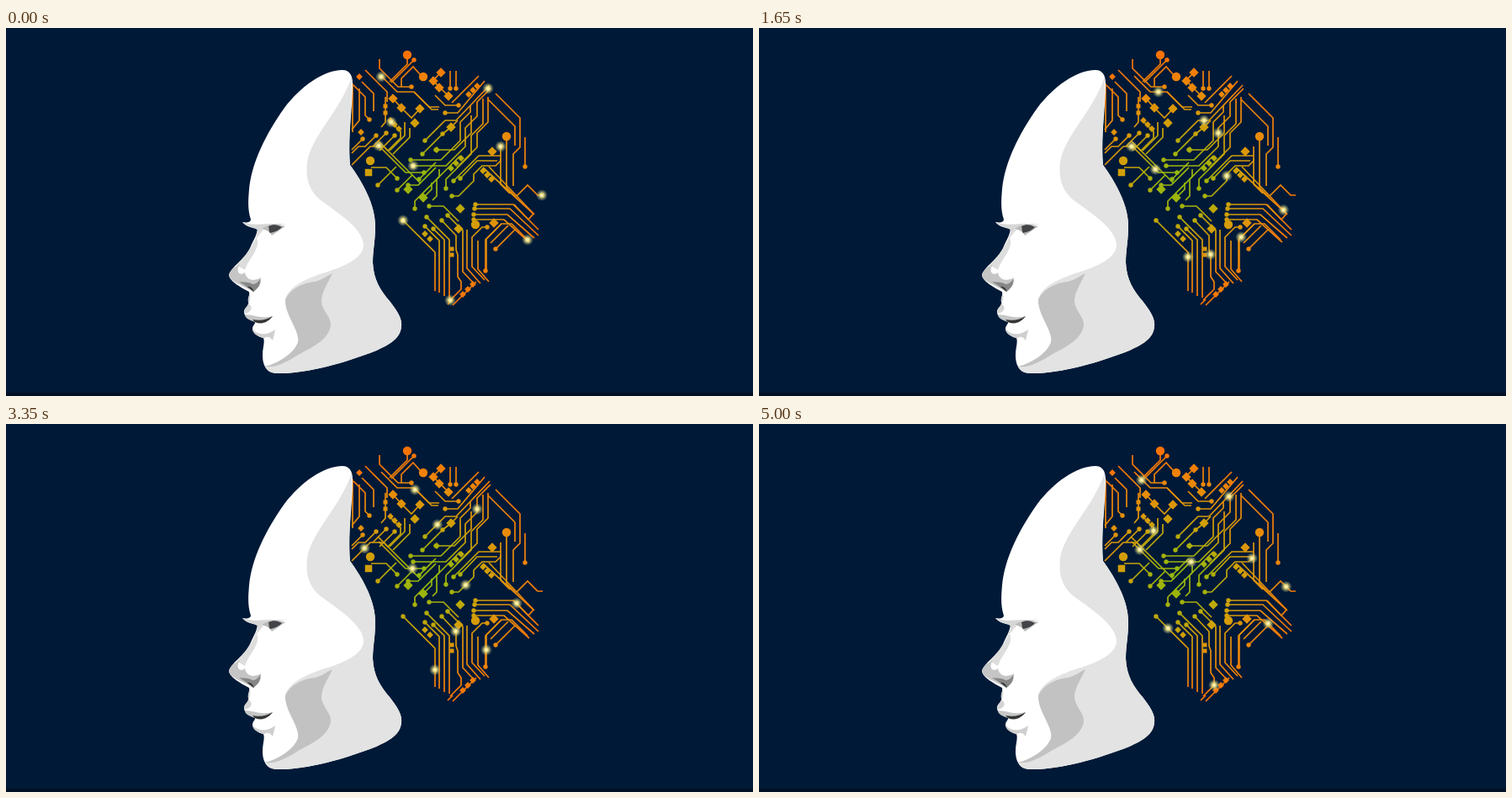
An HTML page for the animation above (5.05 s loop, 888x438 px).

```html
<!DOCTYPE html>
<html lang="en">
<head>
<meta charset="utf-8">
<title>Circuit mind</title>
<style>
html, body { margin: 0; width: 100%; height: 100%; overflow: hidden; background: #001937; }
svg { display: block; width: 100%; height: 100%; }
</style>
</head>
<body>
<svg viewBox="0 0 888 438">
  <defs>
    <radialGradient id="heat" gradientUnits="userSpaceOnUse" cx="500" cy="182" r="150">
      <stop offset="0" stop-color="#8fb90e"/>
      <stop offset=".22" stop-color="#a5b30a"/>
      <stop offset=".45" stop-color="#d0a108"/>
      <stop offset=".72" stop-color="#e98b0a"/>
      <stop offset="1" stop-color="#fb7306"/>
    </radialGradient>
    <radialGradient id="glow">
      <stop offset="0" stop-color="#fffbd0"/>
      <stop offset=".3" stop-color="#f4e68a" stop-opacity=".95"/>
      <stop offset=".55" stop-color="#d9d07c" stop-opacity=".6"/>
      <stop offset="1" stop-color="#b5b57a" stop-opacity="0"/>
    </radialGradient>
  </defs>
  <rect width="888" height="438" fill="#001937"/>
  <rect y="434" width="888" height="4" fill="#001024"/>
  <g id="board" fill="none" stroke="url(#heat)" stroke-width="1.7"></g>
  <g id="parts" fill="url(#heat)"></g>
  <g id="face">
    <path fill="#fff" d="M400 50C408 50 412 56 412 66C412 96 406 132 409 163C424 184 439 210 439 236C439 254 436 264 436 279C437 300 445 312 456 325C465 337 471 345 470 355C469 370 455 377 440 384C402 399 355 412 322 411C309 410 305 401 305 389C305 381 308 374 306 369C299 367 293 363 293 358C293 354 297 352 296 349C288 347 282 342 283 337C284 332 289 331 288 326C287 321 290 319 289 314C280 309 266 302 265 294C267 285 283 276 290 262C293 254 298 248 299 239C292 238 285 236 281 231C287 232 291 231 291 228C287 216 288 205 289 192C292 160 309 126 331 95C350 70 377 50 400 50Z"/>
    <path fill="#e2e3e2" d="M411 58C412 90 406 132 409 163C424 184 439 210 439 236C439 254 436 264 436 279C437 300 445 312 456 325C465 337 471 345 470 355C469 370 455 377 440 384C402 399 355 412 322 411C314 411 309 407 308 402C330 402 354 381 349 365C339 345 331 335 332 322C337 308 354 299 379 291C402 284 425 274 425 258C424 238 393 219 374 205C360 193 356 180 358 160C363 128 398 98 411 58Z"/>
    <path fill="#c1c2c1" d="M388 292C383 304 375 313 375 326C376 337 387 344 386 354C384 371 362 381 349 388C336 396 322 405 308 403C323 399 342 388 347 374C350 361 332 343 332 324C337 311 353 303 367 302C376 300 381 295 388 292Z"/>
    <path fill="#dcdddc" d="M299 241C298 253 286 271 274 282L284 288C287 276 304 261 298 250L307 239Z"/>
    <path fill="#c4c5c4" d="M265 294C267 287 273 284 278 281C272 290 278 296 284 291C286 302 297 301 303 297C304 306 299 310 294 314C283 307 266 302 265 294Z"/>
    <path fill="#858685" d="M277 302C284 303 289 302 293 305C297 305 300 302 302 299C303 306 299 310 294 314C289 309 283 306 277 302Z"/>
    <path fill="#303234" d="M287 308C290 307 293 309 295 314Z"/>
    <path fill="#d5d6d5" d="M281 231C298 237 312 231 334 234C322 234 309 235 300 242C299 238 289 238 281 231Z"/>
    <path fill="#b9bab9" d="M304 239C312 233 322 233 332 236L316 247C313 242 309 240 304 239Z"/>
    <path fill="#424447" d="M312 236C318 233 323 234 328 237C324 241 319 243 314 244C312 241 313 239 312 236Z"/>
    <path fill="#d4d5d4" d="M289 315C292 321 289 324 289 329C294 332 292 339 283 340C282 333 289 332 288 326C287 321 290 319 289 315Z"/>
    <path fill="#c6c7c6" d="M284 341C293 341 300 345 311 344L317 343C311 351 302 354 296 350C288 347 284 345 284 341Z"/>
    <path fill="#333537" d="M293 347C303 349 310 347 317 343C311 351 303 353 296 350Z"/>
    <path fill="#cecfce" d="M293 358C298 365 309 367 320 359C319 365 318 367 317 372C313 366 310 368 306 369C299 367 293 363 293 358Z"/>
  </g>
  <g id="lights"></g>
</svg>
<script>
const NS = 'http://www.w3.org/2000/svg';
const LOOP = 5050, HALF = 2780, STEP = 50;
const el = (id) => document.getElementById(id);
const add = (parent, tag, attrs) => {
  const node = document.createElementNS(NS, tag);
  for (const k in attrs) node.setAttribute(k, attrs[k]);
  return parent.appendChild(node);
};
const dot = (x, y, r) => add(el('parts'), 'circle', { cx: x, cy: y, r });
const chip = (x, y, s, turn = 45) => add(el('parts'), 'rect', {
  x: x - s / 2, y: y - s / 2, width: s, height: s, transform: `rotate(${turn} ${x} ${y})`
});

// A leading "o" puts a solder dot on the first point.
const crown = [
  'o482 70H466L444 48V37', 'M446 57L465 76H485L506 97H514', 'M427 50L453 76V88',
  'o485 38L458 65', 'M477 36V43L456 64', 'M492 55L484 46L470 60V70',
  'o432 109L427 104V82L413 68', 'M423 64L437 78V99', 'M412 66V124', 'M420 72V110L411 121',
  'M451 82V112L446 118', 'M460 84L470 95', 'M470 95L482 107L492 96', 'M508 63L526 81',
  'M517 53L507 63', 'o528 72V51', 'o535 72V51', 'o538 92H522L510 80',
  'M562 57L530 89', 'o522 101H537L569 63', 'o498 134L522 110H535L575 68', 'M485 76L503 94H515'
];
const side = [
  'o440 128L427 141H419L411 149', 'o452 125L436 141', 'M458 112L469 123V131L454 146L449 141H433L411 163',
  'o462 128L444 146', 'M474 112V128L456 146', 'M442 134L493 185', 'o497 172H475L443 140',
  'o442 187L464 165', 'o465 179L452 166H434', 'M480 119V130L460 150', 'o424 132L411 145'
];
const centre = [
  'o484 164H523L546 141V119L560 105V88L576 72', 'o481 157H517L540 134V112L552 100V92',
  'o491 180L511 160', 'o511 145H533L553 125V104', 'o519 126L529 118L537 110', 'o478 187H490L511 166',
  'o495 150L519 126', 'o465 193L483 175', 'o523 191V180L553 150V128L567 114V84',
  'o486 215V206L515 177V168', 'M507 205L512 200V180L540 152', 'o532 182L562 152H588',
  'o530 200H538L556 182V174L566 164H582L588 158V141', 'M573 82V112L560 125V142L536 166',
  'o540 179L560 158H584', 'M496 202L506 192V184'
];
const right = [
  'M582 78L611 107V142L603 150V188', 'M573 85L605 117V140', 'o617 165V130', 'M595 129V190L606 201',
  'M588 156V186L599 197', 'M638 199H632L620 187L607 200', 'M567 166L627 221L621 228L604 210',
  'M574 165L628 222', 'o558 210H603L633 240', 'o557 215H599L633 247', 'o556 222H596L628 250',
  'o556 228H592L622 255', 'M620 252L601 233H589L571 251V290', 'o582 263L605 240', 'M576 256L597 235'
];
const stem = [
  'o472 229L510 267V313', 'o498 236L515 253V315', 'o508 239L521 252V319', 'o500 225L527 252V321',
  'o518 229L535 247V264L537 270V296L541 302V311L528 324', 'o525 223L543 241V290L557 305',
  'o503 212H520L538 230', 'M548 240V286L564 304', 'o572 237H566L554 249V284L569 300',
  'o570 289V252L589 233', 'M561 253V287L574 302', 'M531 330L559 302', 'M525 329L531 323'
];
for (const trace of [...crown, ...side, ...centre, ...right, ...stem]) {
  add(el('board'), 'path', { d: trace.replace('o', 'M') });
  if (trace[0] === 'o') dot(...trace.match(/\d+/g).slice(0, 2), 2.7);
}

for (const [x, y] of [[477, 32], [496, 58], [595, 129], [433, 158], [558, 234]]) dot(x, y, 5.2);
for (const [x, y] of [[517, 53], [508, 63], [515, 71], [526, 81], [460, 84], [470, 95], [492, 96],
  [486, 113], [529, 118], [578, 147], [478, 192], [496, 202], [540, 215], [538, 239], [580, 232]]) chip(x, y, 8);
for (const [x, y] of [[420, 58], [422, 124], [512, 145], [498, 245], [504, 251]]) chip(x, y, 5.5);
for (const [x, y] of [[451, 93], [451, 101], [530, 263], [530, 270]]) chip(x, y, 5, 0);
chip(431, 172, 8.5, 0);

// Rows of three small bars lying across a diagonal.
const bars = (x, y, dx, dy) => {
  for (let i = 0; i < 3; i++) chip(x + i * dx, y + i * dy, 5.5);
};
bars(457, 110, 5, 5);
bars(550, 79, 5, -5);
bars(529, 167, 6, -6);
bars(567, 170, 5, 5);
bars(543, 317, 6, -6);

// Each light runs along its route and back; pow bends its pace.
const routes = [
  ['446 58 464 76 484 76 495 87'],
  ['573 72 535 110 523 110 498 134'],
  ['458 112 469 123 469 131 454 146 449 141 433 141 412 162'],
  ['443 140 475 172 497 172'],
  ['484 164 523 164 546 141 546 119 560 105 560 88 572 76'],
  ['588 141 588 158 582 164 566 164 556 174 556 182 538 200 530 200'],
  ['637 199 632 199 620 187 607 200 627 220 621 228 604 210 568 210', 1.5],
  ['472 229 510 267 510 313'],
  ['620 252 601 233 589 233 571 251 571 290'],
  ['528 324 541 311 541 302 537 297 537 270 535 264 535 247 518 229', 1.1]
];
const lights = routes.map(([text, pow = 1]) => {
  const n = text.split(' ').map(Number), legs = [];
  let total = 0;
  for (let i = 0; i + 3 < n.length; i += 2) {
    const [x, y, x2, y2] = n.slice(i, i + 4), len = Math.hypot(x2 - x, y2 - y);
    legs.push({ x, y, dx: x2 - x, dy: y2 - y, len });
    total += len;
  }
  return { legs, total, pow, node: add(el('lights'), 'circle', { r: 7, fill: 'url(#glow)' }) };
});

function render(ms) {
  const u = 1 - Math.abs(1 - ms / HALF);
  for (const { legs, total, pow, node } of lights) {
    let d = total * u ** pow, i = 0;
    while (i < legs.length - 1 && d > legs[i].len) d -= legs[i++].len;
    const { x, y, dx, dy, len } = legs[i];
    node.setAttribute('cx', x + dx * d / len);
    node.setAttribute('cy', y + dy * d / len);
  }
}

const start = performance.now();
function tick() {
  const t = (performance.now() - start) % LOOP;
  render(Math.floor(t / STEP) * STEP);
  requestAnimationFrame(tick);
}
tick();
</script>
</body>
</html>
```
